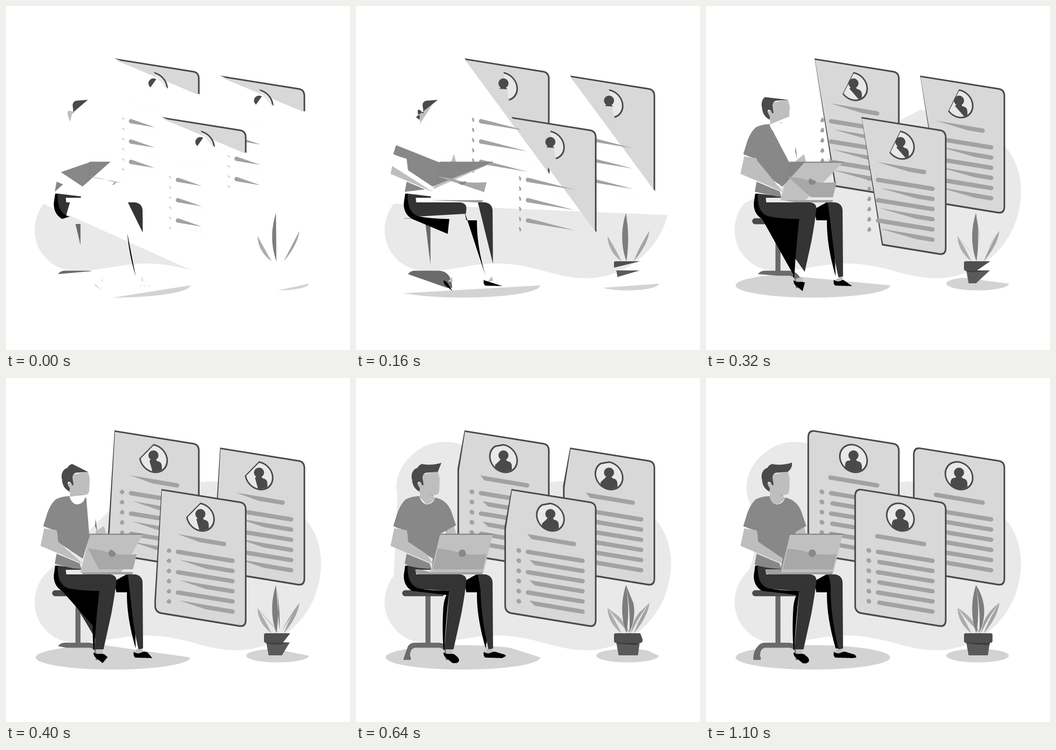
Recreate the animation shown at these times as an HTML page with a canvas. Size 748 by 748 pixels, loop 1600 ms.

```html
<!DOCTYPE html>
<html lang="en">
<head>
<meta charset="utf-8">
<title>Profiles</title>
<style>
html, body { margin: 0; width: 100%; height: 100%; overflow: hidden; background: #fff; }
canvas { display: block; width: 100vw; height: 100vh; }
</style>
</head>
<body>
<canvas id="stage" width="748" height="748"></canvas>
<script>
const ctx = document.getElementById('stage').getContext('2d');
const LOOP = 1600, STEP = 20;
const DARK = '#4a4a4a', SKIN = '#bebebe', SHIRT = '#888', PANTS = '#343434', BAR = '#a2a2a2';

// [time, share of every outline drawn]
const KEYS = [[0, .25], [160, .437], [240, .542], [400, .725], [540, .842], [780, .955], [1100, 1]];
const shapes = [];

// An outline becomes evenly spaced points; its trimmed part is filled.
function add(color, d, { dx = 0, dy = 0 } = {}) {
  const path = document.createElementNS('http://www.w3.org/2000/svg', 'path');
  path.setAttribute('d', d);
  const len = path.getTotalLength(), n = Math.ceil(len), pts = [];
  for (let i = 0; i <= n; i++) {
    const q = path.getPointAtLength(len * i / n);
    pts.push([q.x + dx, q.y + dy]);
  }
  shapes.push({ color, pts });
}

// Clockwise from the top, sheared like the cards.
function disc(color, cx, cy, r, opt = {}) {
  const { dx = 0, dy = 0, start = -Math.PI / 2, shear = .157 } = opt;
  const n = Math.ceil(r * 7), pts = [];
  for (let i = 0; i <= n; i++) {
    const a = start + 2 * Math.PI * i / n, x = r * Math.cos(a);
    pts.push([cx + x + dx, cy + r * Math.sin(a) + x * shear + dy]);
  }
  shapes.push({ color, pts });
}

function oval(color, cx, cy, rx, ry) {
  add(color, `M${cx + rx} ${cy}A${rx} ${ry} 0 0 1 ${cx - rx} ${cy}A${rx} ${ry} 0 0 1 ${cx + rx} ${cy}Z`);
}

// A slanted pill that starts at its upper left.
function bar(x1, y1, x2, y2, clockwise, at) {
  const r = 4.8, cap = `A${r} ${r} 0 0 ${clockwise ? 1 : 0}`;
  add(BAR, clockwise
    ? `M${x1} ${y1 - r}L${x2} ${y2 - r}${cap} ${x2} ${y2 + r}L${x1} ${y1 + r}${cap} ${x1} ${y1 - r}Z`
    : `M${x1} ${y1 - r}${cap} ${x1} ${y1 + r}L${x2} ${y2 + r}${cap} ${x2} ${y2 - r}Z`, at);
}

function card(dx, dy) {
  const at = { dx, dy };
  add(DARK, 'M338 241.2L510 268.6Q523 271.2 523 286V526Q523 543 508 541.2L337 513.2Q322.6 510 322.6 495V257Q322.6 239 338 241.2Z', at);
  add('#d8d8d8', 'M339 244.7L509 272Q519.5 274 519.5 286V526Q519.5 538.8 508 537.4L337.5 509.4Q326.1 506.5 326.1 495V257Q326.1 243 339 244.7Z', at);
  disc(DARK, 422.7, 302.5, 31.4, at);
  disc('#e8e8e8', 422.7, 302.5, 28, at);
  add(DARK, 'M414 307.5L416.5 304.5A10.9 10.7 0 1 1 428 305L431 308.3Q440.5 310 440.8 319L441 327Q424 336 404.3 325.5V318Q405 306 414 307.5Z', at);
  bar(372.5, 344, 474, 361, true, at);
  for (let i = 0; i < 6; i++) {
    const y = i * 22.1, even = i % 2 === 1;
    disc(BAR, 354, 375 + y, 5.1, at);
    bar(even ? 377 : 374, 378 + y, 492.5, 397.5 + y, even, at);
  }
}

function leaf(color, tip, base, outer, mid, mid2, base2, inner) {
  add(color, `M${tip}Q${outer} ${base}Q${mid} ${tip}Q${mid2} ${base2}Q${inner} ${tip}Z`);
}

// Backdrop and ground
add('#e9e9e9', 'M82 430C58 462 56 502 75 533C90 556 108 568 130 573C190 583 250 558 310 560C395 562 430 592 505 592C585 590 650 535 673 470C694 410 688 350 650 305C617 262 560 240 520 234C490 228 462 224 438 225C370 232 320 215 290 188C262 158 232 139 195 139C168 139 150 147 138 155C104 178 88 206 88 240C88 270 106 285 111 305C121 340 105 370 101 395C98 413 92 420 82 430Z');
oval('#d3d3d3', 232.5, 607.5, 168, 26.5);
oval('#d3d3d3', 590.5, 603.7, 68, 14.7);

// Cards
card(-102, -127.5);
card(127.5, -90);
card(0, 0);

// Chair
add('#6b6b6b', 'M151 474H162V577H151Z');
add('#6b6b6b', 'M113 583Q118 576 128 575.5H180Q208 577 209 613H195V606Q195 587 180 586.5H130Q117 587 117.5 606H119V613H103V607Q104 592 113 583Z');
add(DARK, 'M198 461.5H107A6.3 6.3 0 0 0 107 474.5H198Z');

// Ankles
add(SKIN, 'M209 589L210 600L196 599L195 589Z');
add(SKIN, 'M296 588L298 598L281 600L284 588Z');

// Legs
add('#000', 'M282 588Q262 520 263 466H240L235 442L262 427L273 430L290 588Z');
add(PANTS, 'M265 427H281Q297 430 297 446L298 588L288 590Q272 520 271 466Q272 440 265 427Z');
add(PANTS, 'M130 458Q109 447 113 408L163 414V417H130L131 427H225Q241 428 240 442Q236 475 229 513L212 590H192L203 463Z');
add('#000', 'M122 463Q103 452 104 428L107 408H113Q110 448 135 457Q165 463 203 463Q196 520 192 590L190 591Q187 540 190 497Q192 480 197 472Q160 467 122 463Z');

// Shoes
add('#000', 'M210 620L194 607Q189 601 191 596Q197 602 204 600Q210 599 214 601L220 606Q226 612 223 617Q219 622 210 620Z');
add('#000', 'M318 609L281 608Q276 604 278 595Q286 602 296 596Q302 594 308 597L322 601Q328 604 326 608Z');

// Head and neck
add(SKIN, 'M138 258L140 250L138 249L134 235Q133 226 141 228L147 232L145 210L178 203L182 218L181 246Q178 256 168 254V258L172 261Q153 287 138 260Z');
add('#a6a6a6', 'M168 254L158 252L168 257Z');
add(DARK, 'M178 204L152 206Q144 209 145 218L147 232L144 234Q141 224 135 226Q132 230 139 240L138 247Q123 239 122 222Q118 207 128 198L134 195Q136 190 143 187Q165 191 187 184Q188 193 182 200Z');

// Torso and arms
add(SKIN, 'M213 322L218 340H195V333Z');
add('#666', 'M198 333L195 306L193 333Z');
add(SHIRT, 'M106 404L110 382L160 403L164 415Q130 414 106 406Z');
add(SHIRT, 'M181 340L167 393L113 357L110 332Q94 328 81 322L87 303Q94 277 108 264Q122 257 138 257Q142 273 154 275Q168 274 172 260Q198 265 208 292L218 322L196 334L193 340Z');
add(SKIN, 'M167 404L75 365L83 327L110 331Q114 345 112 355L168 393Z');

// Laptop: base, screen, then its thin upper and left rim
add('#9f9f9f', 'M163 422H276L275 427H137Q129 426 129 416H163Z');
add('#c0c0c0', 'M297 341H182L162 423L277 422Z');
add('#868686', 'M167 392L180 341Q181 338.5 184 338.5H297L298 341H184Q182.5 341 182 343L163 422H161Z');
add('#a8a8a8', 'M178 371Q205 373 224 380Q246 386 284 383L276 416H167Z');
disc('#888', 231, 381, 8, { start: 0, shear: 0 });

// Plant
leaf('#adadad', '547 500', '577 555', '548 533', '566 531', '568 528', '596 556', '579 518');
leaf('#a3a3a3', '638 489', '604 555', '634 520', '617 521', '615 518', '598 555', '602 515');
leaf('#7d7d7d', '587 450', '588 555', '570 505', '596 505', '598 510', '594 555', '619 500');
add('#5a5a5a', 'M617 575H566L571 603H613Z');
add('#3d3d3d', 'M617 575H566V577Q592 581 617 580Z');
add('#4f4f4f', 'M618 555H565Q561 555 561 559V571Q561 576 566 576H618Q623 576 623 571V559Q623 555 618 555Z');

const slope = KEYS.map((k, i) => {
  const a = KEYS[Math.max(0, i - 1)], b = KEYS[i + 1];
  return b ? (b[1] - a[1]) / (b[0] - a[0]) : 0;
});

// Smooth curve through the keys
function progress(t) {
  const i = KEYS.findIndex(k => k[0] > t) - 1;
  if (i < 0) return 1;
  const [t0, a] = KEYS[i], [t1, b] = KEYS[i + 1], h = t1 - t0, u = (t - t0) / h;
  const w = u * u * (3 - 2 * u);
  return a + (b - a) * w + h * u * (1 - u) * (slope[i] * (1 - u) - slope[i + 1] * u);
}

function fillPart({ color, pts }, p) {
  const end = p * (pts.length - 1), n = Math.floor(end), f = end - n;
  ctx.beginPath();
  for (let i = 0; i <= n; i++) ctx.lineTo(pts[i][0], pts[i][1]);
  if (f > 0) {
    const [x, y] = pts[n], [x2, y2] = pts[n + 1];
    ctx.lineTo(x + (x2 - x) * f, y + (y2 - y) * f);
  }
  ctx.closePath();
  ctx.fillStyle = color;
  ctx.fill();
}

function draw(t) {
  const p = progress(Math.floor(t / STEP) * STEP);
  ctx.fillStyle = '#fff';
  ctx.fillRect(0, 0, 748, 748);
  for (const s of shapes) fillPart(s, p);
}

const begin = performance.now();
function tick() {
  draw((performance.now() - begin) % LOOP);
  requestAnimationFrame(tick);
}
tick();
</script>
</body>
</html>
```
